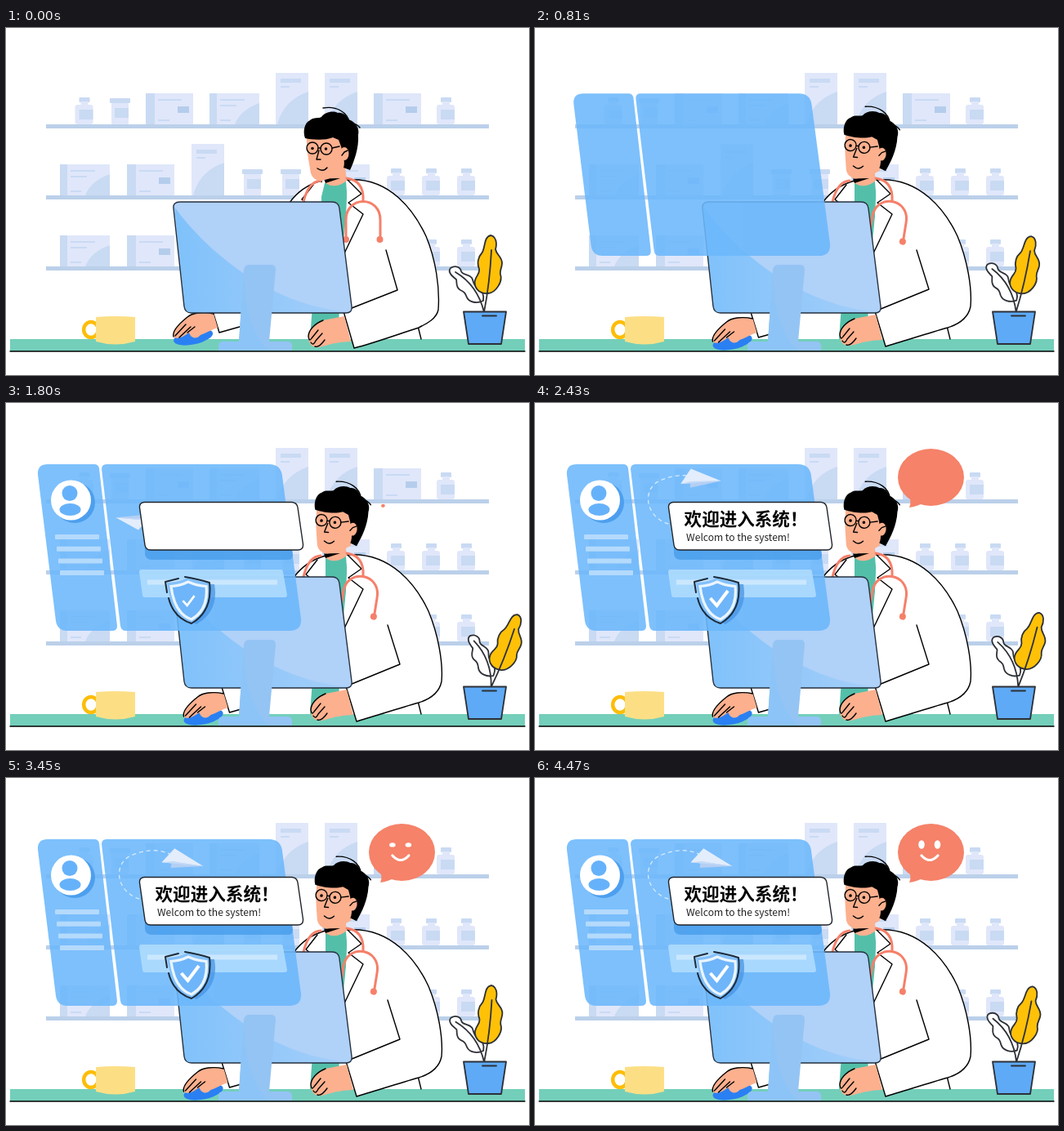
Recreate the animation shown at these times as an HTML page. Size 640x425 px, loop 4.5 s.

```html
<!DOCTYPE html>
<html lang="zh-CN">
<head>
<meta charset="utf-8">
<style>
html, body { margin: 0; height: 100%; overflow: hidden; background: #fff; }
svg { display: block; width: 100vw; height: 100vh; }
text { font-family: "Noto Sans CJK SC", "Noto Sans CJK", "Noto Sans", sans-serif; }
.ink { fill: none; stroke: #000; stroke-width: 1.4; stroke-linecap: round; stroke-linejoin: round; }
.white { fill: #fff; }
.skin { fill: #fcb08e; }
.leaf { stroke: #2d3036; stroke-width: 1.8; stroke-linecap: round; stroke-linejoin: round; }
.coral { fill: none; stroke: #f5806a; stroke-width: 3; stroke-linecap: round; }
</style>
</head>
<body>
<svg viewBox="0 0 640 425">
  <defs>
    <linearGradient id="screen"><stop stop-color="#7fc1fb"/><stop offset="1" stop-color="#a6cff9"/></linearGradient>
    <mask id="flown" maskUnits="userSpaceOnUse" x="0" y="0" width="640" height="425">
      <path id="flownPath" fill="none" stroke="#fff" stroke-width="8"/>
    </mask>
  </defs>

  <g id="shelves"></g>

  <path d="M5 381H635V396H5Z" fill="#73cfba"/>
  <path class="ink" d="M5 396H635"/>
  <ellipse cx="104" cy="369.500" rx="8.800" ry="9.500" fill="none" stroke="#fdbd08" stroke-width="4.500"/>
  <path d="M110 354Q134 352 158 354V384Q134 391 110 384Z" fill="#fcdf85"/>

  <g id="plant">
    <path class="leaf white" d="M544 294C550 290 556 293 557 298C559 303 566 301 570 306C573 312 571 314 577 318C584 322 585 328 584 334C576 338 567 336 564 330C562 325 561 323 556 321C550 318 552 312 551 308C546 304 540 299 544 294Z"/>
    <path class="leaf" fill="#ffc107" d="M593 254C600 255 601 264 599 271C600 278 607 280 607 288C607 294 604 296 605 302C608 310 600 324 590 325C578 326 572 317 574 309C576 302 580 301 579 295C576 288 578 280 582 276C587 270 584 256 593 254Z"/>
    <path class="leaf" fill="none" d="M550 299Q577 315 585 348V365M594 272Q592 312 585 348"/>
  </g>
  <path class="leaf" fill="#5eaaf6" d="M560 347.500H612L606 387H566Z"/>
  <path class="leaf" fill="none" d="M583 352.500H600"/>

  <g id="doctor">
    <path class="white" d="M385 187Q366 194 355 214L325 381H508L504 366L470 250L430 186Z"/>
    <path class="ink" d="M504 365L508 381"/>
    <path fill="#54bfa9" d="M390 190L384 215L372 381H406L412 270L418 212L416 188Z"/>
    <path class="skin" d="M390 172L391 190Q403 198 417 187L414 162Z"/>
    <path d="M389 184.500L409 184L391 190Z"/>
    <path id="coat" class="ink white"/>
    <path class="ink white" d="M418 186L435 203L419 214L437 228L414 276"/>
    <g id="shoulder">
      <path class="ink white" d="M347 214Q361 194 386 187V214Z" stroke-dasharray="50 200"/>
      <path class="ink" d="M376 192L362 210L367 214"/>
    </g>
    <path class="coral" d="M364 213Q370 188 385 187M417 184C432 186 438 196 437 212"/>
    <g id="tube">
      <path class="coral" d="M416 259V235C416 205 458 205 458 235V259"/>
      <circle cx="416" cy="259" r="4" fill="#f5806a"/><circle cx="457.500" cy="259" r="4" fill="#f5806a"/>
    </g>
    <g id="head">
      <path class="skin" d="M368 130C367 150 371 164 373 178Q376 187 386 187Q402 184 414 174L420 140L400 122Z"/>
      <path d="M366 135C363 127 365 116 372 113C376 109 383 111 386 109C390 103 400 101 406 104C412 103 417 107 419 112C428 115 433 123 431 131C432 147 426 163 421 174L413 171C416 164 411 150 410 145L407 137L400 134C390 138 375 137 366 135Z"/>
      <ellipse class="skin" cx="414" cy="154" rx="5.500" ry="8"/>
      <path class="ink" d="M411 156L414 152L418 150M388 98C405 95 418 104 420 115M421 119Q427 115 433 122M383 150L380 161H385M381 172Q388 177 393 171M382 147H385M399 147L408 145"/>
      <circle class="ink" cx="375" cy="147" r="7"/><circle class="ink" cx="392" cy="148" r="7"/>
      <circle cx="375" cy="147.500" r="1.800"/><circle cx="391.500" cy="148" r="1.800"/>
    </g>
    <g id="mouseArm">
      <path class="ink white" d="M250 337L261 373L300 362V337"/>
      <ellipse cx="229" cy="378.500" rx="24.500" ry="9" transform="rotate(-12 229 378)" fill="#2a80f2"/>
      <path class="skin" d="M254 350C240 347 228 349 222 354C212 362 203 371 205 378C209 382 216 379 224 373C226 380 233 382 238 376C245 374 250 370 259 367Z"/>
      <path class="ink" d="M254 350C240 347 228 349 222 354C212 362 203 371 205 378M207 377L220 363M212 379L226 366M222 373L231 366"/>
    </g>
    <g id="deskHand">
      <path class="skin" d="M414 353L388 358C378 362 370 370 370 378C370 388 376 392 383 391C392 389 400 385 422 384Z"/>
      <path class="ink" d="M388 358C378 362 370 370 370 378Q371 385 374 380L382 370M373 385Q376 390 379 383L387 374M378 390Q383 392 390 382"/>
    </g>
  </g>

  <path d="M213 213H399Q407 213 408 221L423 341Q424 349 416 349H227Q219 349 218 341L205 221Q204 213 213 213Z" fill="#b0d1f8"/>
  <path d="M206 219C240 266 318 341 422 348L416 349H227Q219 349 218 341Z" fill="url(#screen)"/>
  <path class="ink" style="stroke:#26313f" d="M213 213H399Q407 213 408 221L423 341Q424 349 416 349H227Q219 349 218 341L205 221Q204 213 213 213Z"/>
  <path d="M297 290H325Q330 290 330 296L322 384H345Q350 384 350 390V395H260V390Q260 384 266 384H285L291 296Q292 290 297 290Z" fill="#94c4f4"/>
  <path d="M291 298C291 340 302 378 322 395H260V390Q260 384 266 384H285Z" fill="#8dc4f7"/>

  <g id="panels" fill="#6cb8fc" opacity=".88">
    <path d="M51 75H108Q113 75 114 80L136 273Q136 279 130 279H75Q63 279 61 267L39 88Q38 75 51 75Z"/>
    <path d="M123 75H322Q336 75 338 89L361 264Q362 279 347 279H147Q141 279 140 273L117 81Q117 75 123 75Z"/>
  </g>

  <g id="avatar">
    <circle cx="84" cy="122" r="25" fill="#4d9fee"/><circle cx="79.500" cy="119" r="24.500" fill="#fff"/>
    <circle cx="78" cy="110.500" r="9.500" fill="#66b2fa"/>
    <ellipse cx="78.500" cy="130.500" rx="13" ry="7.500" fill="#66b2fa"/>
  </g>
  <g id="lines"></g>

  <path id="trail" fill="none" stroke="#d5eafd" stroke-width="1.300" stroke-dasharray="5 4" mask="url(#flown)"
    d="M190 151C134 155 127 106 153 95S196 88 216 102"/>
  <g id="plane">
    <path d="M26 2L-12 -14L-25 5Z" fill="#e3edfc"/>
    <path d="M26 2L-13 2L-13 10Z" fill="#b4cff3"/>
    <path d="M26 2L-13 2L-25 5Z" fill="#c6dbf7"/>
  </g>

  <g id="card">
    <path d="M170 170H349L351 186Q351 192 345 192H178Q171 192 170 185Z" fill="#4b9fed" opacity=".85"/>
    <path class="ink white" style="stroke:#1f2329" d="M169 121.500H350Q356 122 357 128L363.500 173Q364 180 357 180H177Q171 180 170 174L163.500 128Q163 122 169 121.500Z"/>
  </g>
  <g id="greeting">
    <text x="182.500" y="149.800" font-size="21.600" font-weight="700">欢迎进入系统！</text>
    <text x="185" y="168.700" font-size="12.100" fill="#222">Welcom to the system!</text>
  </g>

  <path id="bar" fill="#b0dcfe" opacity=".9"/>
  <path id="barLine" fill="none" stroke="#cfe9fe" stroke-width="6" opacity=".9"/>
  <g id="shield">
    <path d="M231 217Q243 222 255 222Q261 255 233 271Q210 262 205 222Z" fill="#4795e4" opacity=".75"/>
    <path d="M223 214Q236 219 249 220Q253 255 227 270Q203 262 197 220Q213 219 223 214Z" fill="#83c0fa"/>
    <path d="M223 219Q234 224 245 224.500Q248 253 227 265Q206 258 202 224.500Q213 224 223 219Z" fill="#6fb5fa" stroke="#eaf5ff" stroke-width="3.200"/>
    <path class="ink" style="stroke:#1d2b3a;stroke-width:2" d="M219 213Q236 216 249 220Q253 255 227 270Q205 263 199 239M197 232L195 219L211 215"/>
    <path id="check" fill="none" stroke="#fff" stroke-width="4" d="M214.500 239L222.500 248L236 230"/>
  </g>

  <g id="bubble" fill="#f58269">
    <ellipse cx="484.500" cy="91" rx="40.500" ry="35"/><path d="M455 110Q462 119 458 128Q467 127 476 122Z"/>
  </g>
  <g id="face" fill="#fff">
    <g id="eyes"><ellipse cx="473" cy="81.500" rx="3.800" ry="5.200"/><ellipse cx="492.500" cy="81.500" rx="3.800" ry="5.200"/></g>
    <path d="M473 95Q483 106 493 95" fill="none" stroke="#fff" stroke-width="3.200" stroke-linecap="round"/>
  </g>
</svg>
<script>
const $ = id => document.getElementById(id);
const LOOP = 4500, PALE = '#e0e7fa', MID = '#c9daf3', DEEP = '#b5cdec';
const rect = (x, y, w, h, fill, r = 0) => `<rect x="${x}" y="${y}" width="${w}" height="${h}" rx="${r}" fill="${fill}"/>`;
const poly = (d, fill) => `<path d="${d}" fill="${fill}"/>`;

// Shelf goods, each standing on the line y
const goods = {
  bottle: (x, y) => rect(x + 5, y - 33, 13, 6, MID, 1) + rect(x + 7, y - 28, 9, 5, PALE) +
    rect(x, y - 24, 22, 24, PALE, 3) + rect(x + 5, y - 18, 17, 12, MID),
  jar: (x, y) => rect(x, y - 32, 25, 6, MID, 1) + rect(x + 2, y - 26, 21, 26, PALE, 1) + rect(x + 6, y - 20, 17, 12, MID),
  crate: (x, y) => rect(x, y - 38, 58, 38, PALE) + rect(x, y - 38, 11, 38, MID) + rect(x + 15, y - 31, 29, 2, MID) +
    rect(x + 39, y - 22, 14, 8, DEEP) + rect(x + 15, y - 6, 14, 2, MID),
  pack: (x, y) => rect(x, y - 38, 61, 38, PALE) + poly(`M${x + 61} ${y - 26}Q${x + 38} ${y - 18} ${x + 31} ${y}H${x + 61}Z`, MID) +
    rect(x, y - 38, 9, 38, MID) + rect(x + 13, y - 31, 30, 2, MID) + rect(x + 13, y - 24, 20, 2, MID) + rect(x + 13, y - 6, 13, 2, MID),
  tall: (x, y) => rect(x, y - 63, 40, 63, PALE) + poly(`M${x + 40} ${y - 40}Q${x + 10} ${y - 30} ${x + 2} ${y}H${x + 40}Z`, MID) +
    rect(x + 6, y - 56, 25, 5, MID) + rect(x + 6, y - 47, 11, 2, MID),
};
const stock = [
  [118, { bottle: [84.5, 527], jar: [127], crate: [171, 450], pack: [249], tall: [330, 390] }],
  [205, { pack: [66], crate: [148, 387], tall: [227], jar: [289, 336], bottle: [466, 509, 552] }],
  [292, { pack: [66], crate: [148], bottle: [509, 552] }],
];
$('shelves').innerHTML = stock.map(([y, row]) =>
  Object.entries(row).map(([kind, xs]) => xs.map(x => goods[kind](x, y)).join('')).join('') +
  rect(49, y, 542, 5, '#bbd0ea')).join('');
$('lines').innerHTML = [0, 1, 2, 3].map(i => rect(60 + 2 * i, 161 + 14.7 * i, 0, 6, '#b4dafc', 1)).join('');

const span = (t, from, length) => Math.min(1, Math.max(0, (t - from) / length));
const smooth = p => p * p * (3 - 2 * p);
const pop = p => 1 + 2 * (p - 1) ** 3 + (p - 1) ** 2; // grows past 1, then settles
const move = (id, value) => $(id).setAttribute('transform', value);
const scale = (id, x, y, sx, sy = sx) => move(id, `translate(${x} ${y}) scale(${sx} ${sy}) translate(${-x} ${-y})`);

const coatFrom = 'M418 186C470 182 500 225 514 255C526 284 531 318 529 345C527 356 515 362 505 367C480 375 450 386 426 392L413 347L479 321L465 272';
const coatTo = 'M418 186C472 182 503 225 517 255C529 284 535 318 533 341C530 356 518 363 505 367C480 374 450 384 429 390L416 347L482 320L467 272';
function blend(a, b, p) {
  const ends = b.match(/\d+/g);
  let i = 0;
  return a.replace(/\d+/g, n => +n + (ends[i++] - n) * p);
}

const trail = $('trail'), trailLength = trail.getTotalLength();
$('flownPath').setAttribute('d', trail.getAttribute('d'));

function draw(t) {
  const sway = 7.5 * (1 - Math.cos(2 * Math.PI * t / 3600));
  move('plant', `rotate(${sway} 590 381)`);

  const lean = smooth(span(t, 0, 540));
  $('coat').setAttribute('d', blend(coatFrom, coatTo, lean));
  move('head', `translate(${7.5 * lean} ${-lean}) rotate(${6 * lean} 400 180)`);
  move('shoulder', `translate(${5 * lean} 0)`);
  move('tube', `rotate(${9 * lean} 437 212)`);
  move('mouseArm', `translate(${12.5 * lean} ${6 * lean})`);
  move('deskHand', `translate(${3 * lean} ${-2 * lean})`);

  scale('panels', 361, 279, pop(span(t, 560, 550)));
  scale('avatar', 80, 119, pop(span(t, 1080, 260)));
  scale('card', 264, 151, pop(span(t, 1060, 270)));
  scale('shield', 224, 242, pop(span(t, 1090, 250)));
  [...$('lines').children].forEach((line, i) =>
    line.setAttribute('width', 54 * smooth(span(t, 930 + 112 * i, 400))));

  const w = 176 * smooth(span(t, 1130, 380)), right = 163 + w;
  $('bar').setAttribute('d', w < 10 ? '' :
    `M166 204H${right - 3}Q${right} 204 ${right} 207L${right + 5} 235Q${right + 5} 238 ${right + 2} 238H170Q167 238 167 235L163 207Q163 204 166 204Z`);
  $('barLine').setAttribute('d', w < 20 ? '' : `M173 219.500H${right - 7}`);
  scale('check', 220, 248, pop(span(t, 1735, 300)));

  const flight = span(t, 1590, 930), far = trailLength * flight;
  const here = trail.getPointAtLength(far), back = trail.getPointAtLength(Math.max(0, far - 1)),
    ahead = trail.getPointAtLength(far + 1);
  const angle = Math.atan2(ahead.y - back.y, ahead.x - back.x) * 180 / Math.PI;
  move('plane', `translate(${here.x} ${here.y}) rotate(${angle - 26}) scale(${flight && .7 + .3 * flight})`);
  $('flownPath').setAttribute('stroke-dasharray', `${far} 999`);

  const hello = smooth(span(t, 1950, 500));
  $('greeting').setAttribute('opacity', hello);
  scale('greeting', 255, 152, .6 + .4 * hello);

  scale('bubble', 460, 128, pop(span(t, 1795, 400)));
  const shown = smooth(span(t, 2450, 150));
  const glance = t > 2600 && t < 4300 ? -14 * Math.sin(2 * Math.PI * (t - 2600) / 850) : 0;
  const blink = Math.max(0, 1 - Math.abs(t - 3450) / 110);
  $('face').setAttribute('opacity', shown);
  move('face', `translate(${glance} 0)`);
  scale('eyes', 483, 82.5, 1, 1 - .5 * blink);
}

const start = performance.now();
(function frame() {
  draw((performance.now() - start) % LOOP);
  requestAnimationFrame(frame);
})();
</script>
</body>
</html>
```
